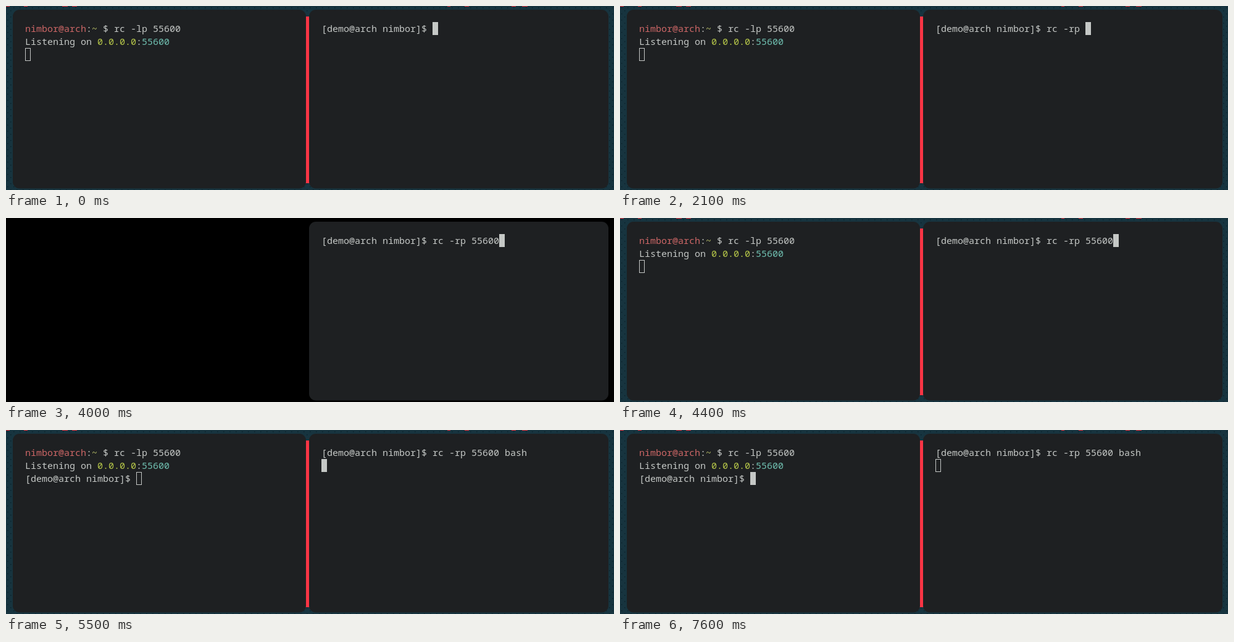
Recreate the animation shown at these times as an HTML page with a canvas. Size 985 by 298 pixels, loop 8 s.

```html
<!DOCTYPE html>
<html lang="en">
<head>
<meta charset="utf-8">
<title>Reverse shell</title>
<style>
html, body { margin: 0; width: 100%; height: 100%; overflow: hidden; background: #000; }
canvas { display: block; }
</style>
</head>
<body>
<canvas id="stage" width="985" height="298"></canvas>
<script>
const ctx = document.getElementById('stage').getContext('2d');
const W = 985, H = 298, LOOP = 8000;
const CELL = 9, LINE = 21, TOP = 26, LEFT = 31, RIGHT = 511;
const BG = '#1e2022', FG = '#c5c8c6', RED = '#cc6666', LIME = '#b9ca4a', CYAN = '#70c0b1';
const PROMPT = '[demo@arch nimbor]$ ';
const COMMAND = 'rc -rp 55600 bash';

// [time, characters of the command entered so far]
const KEYS = [
  [0, 0], [800, 1], [900, 2], [1200, 3], [1400, 4], [1600, 5], [1700, 6],
  [2100, 7], [3600, 12], [4500, 13], [4800, 14], [4900, 15], [5000, 17]
];

function rect(color, x, y, w, h) {
  ctx.fillStyle = color;
  ctx.fillRect(x, y, w, h);
}

function panel(x, w) {
  ctx.fillStyle = BG;
  ctx.beginPath();
  ctx.roundRect(x, 6, w, 289.5, 11);
  ctx.fill();
}

// Draws [text, color] pairs on one row and returns the next column.
function write(x, row, ...runs) {
  let col = 0;
  for (const [text, color] of runs) {
    ctx.fillStyle = color;
    ctx.fillText(text, x + col * CELL, TOP + row * LINE + 16);
    col += text.length;
  }
  return col;
}

function cursor(x, col, row, filled) {
  const cx = x + col * CELL, cy = TOP + row * LINE;
  if (filled) {
    rect(FG, cx, cy, CELL, LINE);
  } else {
    ctx.strokeStyle = FG;
    ctx.lineWidth = 1;
    ctx.strokeRect(cx + 0.5, cy + 0.5, CELL - 1, LINE - 1);
  }
}

function wallpaper() {
  rect('#17343f', 0, 0, W, H);
  for (let y = 2, odd = 0; y < H; y += 5, odd ^= 1) {
    for (let x = 2 + odd * 5; x < W; x += 10) rect('#0c232c', x, y, 1.5, 1.5);
  }
  // lower edges of the lettering above the windows
  for (const [x, w] of [[0, 6], [29, 6], [91, 9], [107, 8], [715, 5], [743, 7], [819, 7], [836, 9]]) {
    rect('#e2323f', x, 0, w, 1);
  }
  rect('#f93545', 470, 17, 40, 270);
}

function leftTerminal(t) {
  panel(11, 475);
  write(LEFT, 0, ['nimbor@arch', RED], [':', FG], ['~', '#b5bd68'], [' $ rc -lp 55600', FG]);
  write(LEFT, 1, ['Listening on ', FG], ['0.0.0.0', LIME], [':', FG], ['55600', CYAN]);
  const col = t >= 5500 ? write(LEFT, 2, [PROMPT, FG]) : 0;
  cursor(LEFT, col, 2, t >= 7600);
}

function rightTerminal(t) {
  panel(491, 485);
  const typed = KEYS.filter(k => k[0] <= t).pop()[1];
  const end = write(RIGHT, 0, [PROMPT, FG], [COMMAND.slice(0, typed), FG]);
  // pasted text stays highlighted for a moment
  if (t >= 3600 && t < 4000) {
    const x = RIGHT + (end - 5) * CELL;
    rect(FG, x, TOP, 5 * CELL, LINE);
    write(x, 0, ['55600', BG]);
  }
  if (t >= 5500) cursor(RIGHT, 0, 1, t < 6700);
  else cursor(RIGHT, end, 0, true);
}

function draw(t) {
  ctx.font = '15px "Noto Sans Mono", monospace';
  ctx.textBaseline = 'alphabetic';
  if (t >= 4000 && t < 4400) {
    rect('#000', 0, 0, W, H);
  } else {
    wallpaper();
    leftTerminal(t);
  }
  rightTerminal(t);
}

const start = performance.now();
function tick() {
  draw((performance.now() - start) % LOOP);
  requestAnimationFrame(tick);
}
tick();
</script>
</body>
</html>
```
